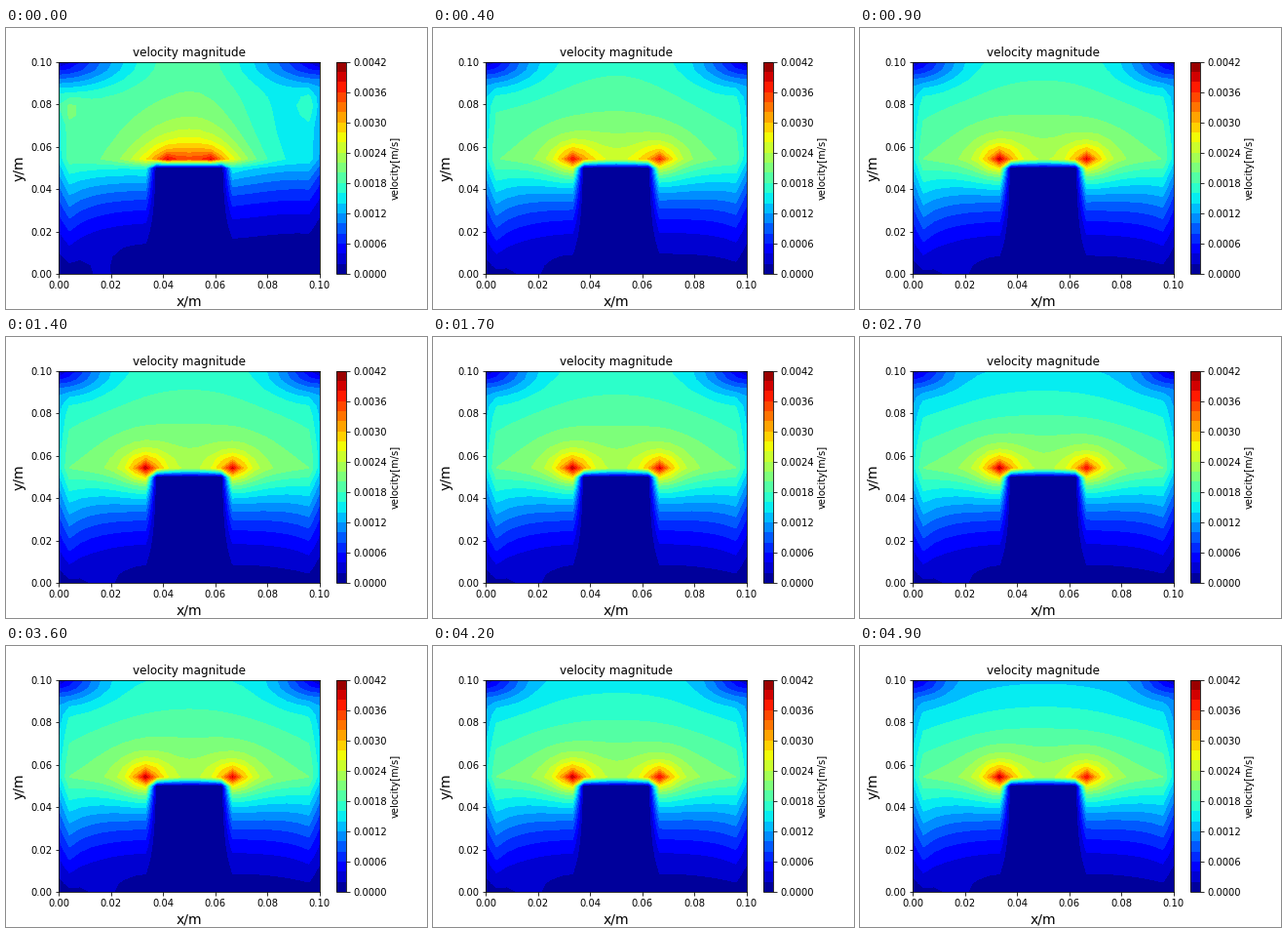
Animation, 432 px wide and 288 px high, one loop 5 s. Source, as a matplotlib script:

```python
import numpy as np
import matplotlib.pyplot as plt
from matplotlib.animation import FuncAnimation

FRAMES, INTERVAL = 50, 100
N = 25
UNIT = 1e-4  # speeds below are in 1e-4 m/s
LEVELS = np.arange(22) * 2 * UNIT
RIM = 13     # first grid row above the block

I, J = np.meshgrid(np.arange(N), np.arange(N))
EDGE = np.minimum(I, N - 1 - I)
LEFT = I < N / 2
BLOCK = (J < RIM) & (abs(I - 12) <= 3)


def peak(i, height, falloff):
    return height * np.exp(-falloff * np.hypot(I - i, J - RIM))


def blob(i, j, height, width, tall):
    return height * np.exp(-((I - i) / width) ** 2 - ((J - j) / tall) ** 2)


def soft_min(a, b, sharpness=10):
    a, b = np.maximum(a, 1e-3), np.maximum(b, 1e-3)
    return (a ** -sharpness + b ** -sharpness) ** (-1 / sharpness)


def assemble(top, base, power, extra, reach):
    """Fade the upper flow down to the floor, slow the walls, still the corners."""
    lower = base + (top[RIM] - base) * (J / RIM) ** power
    grid = np.minimum(top, lower) + extra
    grid = np.where(EDGE == 0, grid * np.clip(0.3 + 0.035 * J, 0, 0.8), grid)
    grid[0, EDGE[0] == 0] = 0
    corner = 14 * np.hypot(EDGE / reach, (N - 1 - J) / 3) ** 0.8
    return soft_min(grid, corner)


def starting_flow():
    right = np.clip((I - 13) / 9, 0, 1)
    top = 18.9 - 3.8 * right ** 2 * (3 - 2 * right)
    base = 1 - 0.5 * right + blob(4, 0, 1.2, 2, 3)
    power = 2.3 - np.where(LEFT, 1.0, 0.1) * np.exp(-(EDGE - 1) / 3)
    hump = 15 * np.exp(-((I - 12) / 5) ** 2 - (J - RIM) / 3) * (J >= RIM)
    spots = blob(0.5, 20, 6, 1.6, 2) + blob(23, 19.5, 3, 1, 2)
    extra = hump + spots + peak(10, 8, 1.2) + peak(14, 8, 1.2)
    return assemble(top, base, power, extra, reach=6)


def settled_flow(slump):
    top = 17 + 0.45 * (N - 1 - J) - 2 * ((I - 12) / 11) ** 2
    top = top - 2.6 * slump * np.clip((J - RIM) / 11, 0, 1)
    base = 1.4 + blob(4, 0, 0.8, 2, 3)
    power = 2 - np.where(LEFT, 0.9, 0.6) * np.exp(-(EDGE - 1) / 3)
    extra = peak(8, 20.5, 0.8) + peak(16, 18.5 - slump, 0.8)
    return assemble(top, base, power, extra, reach=4.75)


def speed(n):
    slump = np.interp(n, [14, 21, 27, 36, 49], [0, 0.3, 1, 0.3, 1.3])
    start = np.exp(-n / 2.2)
    grid = start * starting_flow() + (1 - start) * settled_flow(slump)
    grid[BLOCK] = 0
    return np.clip(grid, 0, 41.9) * UNIT


axis = np.linspace(0, 0.1, N)
plt.rcParams.update({"font.family": "DejaVu Sans", "font.size": 10})
fig, ax = plt.subplots(figsize=(6, 4), dpi=72)
fig.subplots_adjust(left=0.125, right=0.9, bottom=0.125, top=0.88)


def contours(n):
    return ax.contourf(axis, axis, speed(n), LEVELS, cmap="jet", vmin=0, vmax=0.0042)


filled = contours(0)
bar = fig.colorbar(filled, ax=ax, ticks=LEVELS[::3], format="%.4f")
bar.set_label("velocity[m/s]")
ax.set_title("velocity magnitude", fontsize=12)
ax.set_xlabel("x/m", fontsize=14)
ax.set_ylabel("y/m", fontsize=14)


def update(n):
    global filled
    filled.remove()
    filled = contours(n)
    return filled,


anim = FuncAnimation(fig, update, frames=FRAMES, interval=INTERVAL,
                     init_func=lambda: (), repeat=True, repeat_delay=0)
plt.show()
```
